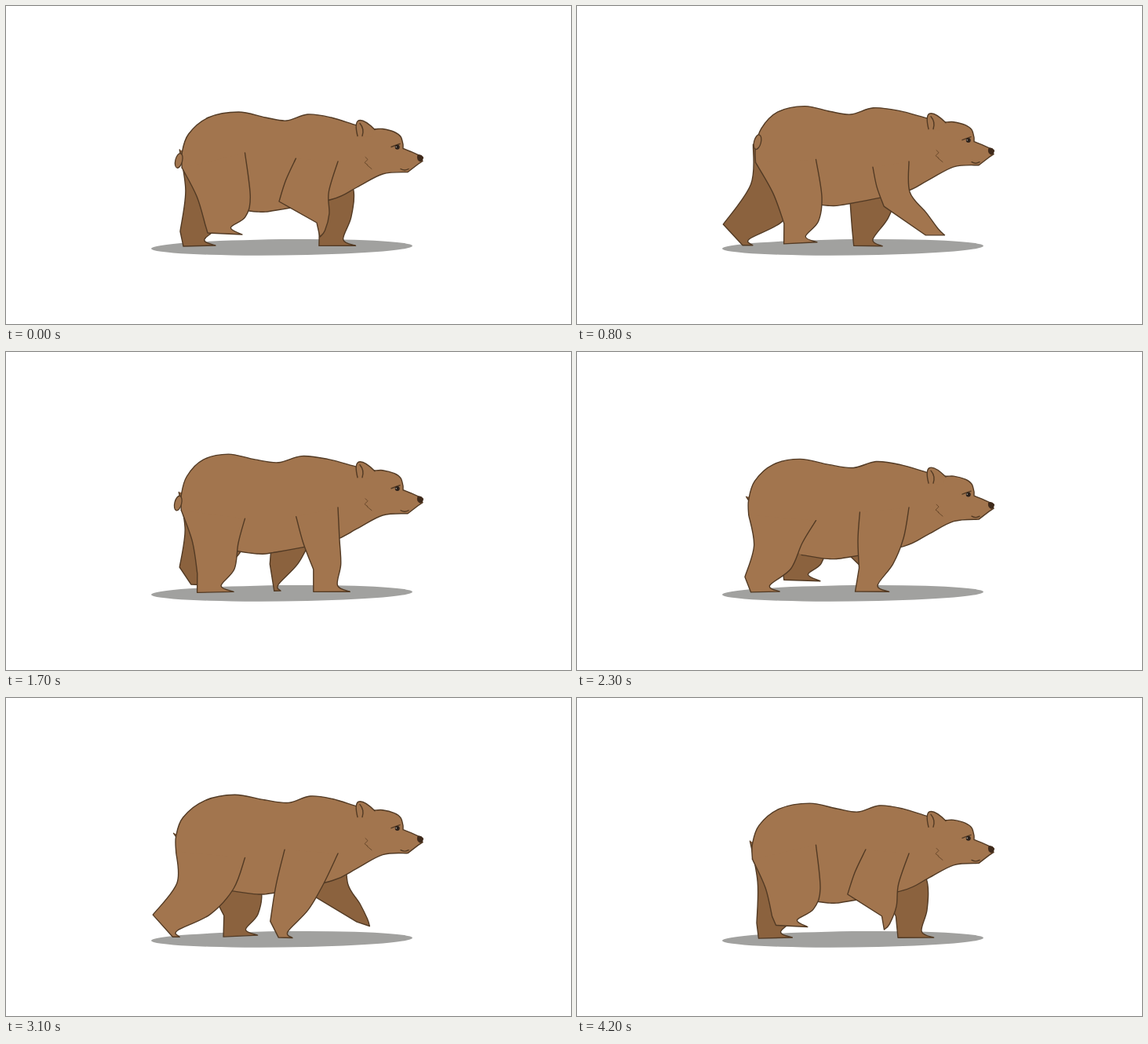
Write an HTML page that moves like this. It is 720 by 405 pixels and loops after 4300 ms.

```html
<!DOCTYPE html>
<html lang="en">
<head>
<meta charset="utf-8">
<title>Walking bear</title>
<style>
  html, body { margin: 0; width: 100%; height: 100%; overflow: hidden; background: #fff; }
  svg { display: block; width: 100%; height: 100%; }
  path, ellipse { stroke-linecap: round; stroke-linejoin: round; }
  .fur { fill: #a2754e; }
  .shade { fill: #8b623e; stroke: #523a24; stroke-width: 1.4; }
  .line { fill: none; stroke: #523a24; stroke-width: 1.4; }
  .thin { fill: none; stroke: #6b4a2c; stroke-width: 1; }
</style>
</head>
<body>
<svg viewBox="0 0 720 405">
  <ellipse cx="351.5" cy="307.3" rx="166.5" ry="10.2" fill="#a1a19f" transform="rotate(-.6 351.5 307.3)"/>
  <path id="farHind" class="shade"/>
  <path id="farFore" class="shade"/>
  <path id="body" class="fur"/>
  <path id="outline" class="line"/>
  <path id="hindFur" class="fur"/>
  <path id="hind" class="line"/>
  <path id="foreFur" class="fur"/>
  <path id="fore" class="line"/>
  <ellipse id="tail" class="fur" rx="4.4" ry="9.5" stroke="#523a24" stroke-width="1.3"/>
  <g id="head">
    <path class="fur" d="M449 168C446 160 445 149 449 146.500C455 144 464 152 470 158L466 167Z"/>
    <path class="line" d="M448 166C446 158 445 149 449 146.500C455 144 464 152 470 158"/>
    <path class="line" d="M451 150Q457 157 454 166"/>
    <path class="line" d="M491 180Q496 178 502 176M503 208Q508 211 513 208"/>
    <path class="thin" d="M458 193L461 196L457 200L461 203M460 203L466 208"/>
    <circle cx="498.700" cy="180.300" r="3" fill="#2b211b"/>
    <circle cx="497.300" cy="180" r=".8" fill="#b9b3a8"/>
    <path d="M524 191Q528 188 532 193Q532 197 528 199Q523 197 524 191Z" fill="#3f2a1b"/>
  </g>
</svg>
<script>
const LOOP = 4300;

const spine = [[222, 206], [222, 187], [230, 163], [254, 142], [290, 135],
               [325, 142], [354, 146], [382, 138], [413, 142], [447, 152]];
const brow = [[467, 157], [480, 157], [495, 161], [503, 167], [506, 177]];
const snout = [[506, 182], [516, 186], [527, 191], [531, 198], [525, 202], [512, 212]];
const belly = [[480, 214], [447, 231], [416, 246], [345, 260], [320, 262], [286, 257]];

// Hock (or wrist), heel and toe at six even steps of a stride
const hindStride = [
  [[254, 279], [257, 289], [301, 291]],
  [[264, 277], [264, 302], [306, 300]],
  [[254, 279], [253, 306], [300, 305]],
  [[222, 287], [226, 306], [267, 305]],
  [[187, 279], [211, 305], [226, 305]],
  [[203, 272], [224, 301], [229, 301]]
];
const foreStride = [
  [[348, 249], [396, 276], [400, 294]],
  [[388, 253], [444, 290], [466, 291]],
  [[402, 278], [412, 304], [455, 304]],
  [[366, 272], [359, 305], [405, 305]],
  [[340, 290], [352, 305], [377, 306]],
  [[337, 264], [344, 302], [349, 303]]
];

const $ = id => document.getElementById(id);
const draw = (id, d) => $(id).setAttribute('d', d);
const wave = (p, peak) => Math.cos(2 * Math.PI * (p - peak));
const mix = (a, b, k) => a.map((v, i) => v + (b[i] - v) * k);
const move = ([x, y], dx, dy) => [x + dx, y + dy];

// Cubic through b and c, with neighbours a and d
const cubic = (a, b, c, d, k) =>
  b + k / 2 * (c - a + k * (2 * a - 5 * b + 4 * c - d + k * (3 * (b - c) + d - a)));

function strideAt(stride, phase) {
  const n = stride.length, s = (phase % 1 + 1) % 1 * n, i = Math.floor(s);
  const near = [-1, 0, 1, 2].map(d => stride[(i + d + n) % n]);
  return stride[0].map((_, joint) => [0, 1].map(axis =>
    cubic(...near.map(row => row[joint][axis]), s - i)));
}

// Smooth curve through points, without the opening move
function curve(pts) {
  let d = '';
  for (let i = 0; i < pts.length - 1; i++) {
    const p = pts[i - 1] || pts[i], a = pts[i], b = pts[i + 1], n = pts[i + 2] || b;
    const c = [0, 1].map(j => a[j] + (b[j] - p[j]) / 6);
    const e = [0, 1].map(j => b[j] - (n[j] - a[j]) / 6);
    d += `C${[...c, ...e, ...b].map(v => v.toFixed(1))}`;
  }
  return d;
}

// Outline of a limb: down the rear, around the foot, up the front
function limb(rear, crease, front, [hock, heel, toe], bulge, bend) {
  const dx = toe[0] - heel[0], dy = toe[1] - heel[1], len = Math.hypot(dx, dy) || 1;
  const mid = move(mix(rear, hock, .5), bulge, 0);
  const instep = move(mix(heel, toe, .66), 8 * dy / len, -8 * dx / len);
  const shin = move(mix(instep, front, .5), bend, bend);
  return `M${rear}${curve([rear, mid, hock])}L${heel}L${toe}${curve([toe, instep, shin, front, crease])}`;
}

// The far legs reach further forward than the near ones
const reach = (p, far) => far ? 15 * Math.max(0, wave(p, .25)) : 0;

function hindLeg(p, rump, far) {
  const ahead = reach(p, far);
  const joints = strideAt(hindStride, p).map(j => move(j, ahead, 0));
  const bulge = 4 + .25 * Math.max(0, 235 - joints[0][0]);
  return limb(rump, [304.5, 201 - 14 * wave(p, 0)], [300 + 14 * wave(p, .1) + ahead, 243], joints, bulge, 6);
}

function foreLeg(p, far) {
  const ahead = reach(p, far), spread = far ? 2 : 1;
  const joints = strideAt(foreStride, p).map(j => move(j, ahead, 0));
  const rear = [366 + 11 * spread * wave(p, .2), 200 + 10 * wave(p, .35)];
  return limb(rear, [423 + ahead, 198], [415 + 12 * spread * wave(p, .3) + ahead, 237], joints, -2, 3);
}

function stepTime(t) {
  if (t >= 4200) return 4200;
  const base = t < 1100 ? 0 : 1100;
  return base + Math.floor((t - base) / 200) * 200;
}

function render(t) {
  const p = t / LOOP;
  const bob = 7.5 * wave(2 * p, .07) - 1.8 * wave(4 * p, 0) - 5;
  const lift = ([x, y]) => [x, y + bob * (.65 + x / 800)];

  // A wave runs along the back while the rump follows the near leg
  const sway = ([x, y]) => {
    const lag = Math.min(.19, .06 + (x - 290) * .0018);
    const back = 8 * Math.sin(Math.PI * Math.max(0, x - 215) / 234) * wave(p, -lag);
    const rump = 5 * Math.max(0, (255 - x) / 33) * wave(p, .2);
    return lift([x, y]).map((v, i) => i ? v : v + back + rump);
  };

  const headY = 1.2 * bob - .5;
  const nod = point => move(point, 0, headY);
  const back = spine.map(sway), face = snout.map(nod);
  const top = [...back, ...brow.map(nod)];
  const body = `M${top[0]}${curve(top)}L${face.join('L')}${curve([face[5], ...belly.map(lift)])}`;
  draw('body', body + 'Z');
  draw('outline', body);

  const hind = hindLeg(p, back[0], false), fore = foreLeg(p, false);
  draw('hindFur', hind + 'Z');
  draw('hind', hind);
  draw('foreFur', fore + 'Z');
  draw('fore', fore);
  draw('farHind', hindLeg(p + .5, move(back[1], -3, -4), true));
  draw('farFore', foreLeg(p + .4, true));

  const wag = Math.sin(Math.PI * t / 1700);
  const [tailX, tailY] = move(back[0], -4 + 6.5 * wag, -9 - 17 * wag);
  $('tail').style.display = t < 2000 ? '' : 'none';
  $('tail').setAttribute('transform', `translate(${tailX} ${tailY}) rotate(14)`);
  $('head').setAttribute('transform', `translate(0 ${headY})`);
}

const start = performance.now();
function tick() {
  render(stepTime((performance.now() - start) % LOOP));
  requestAnimationFrame(tick);
}
tick();
</script>
</body>
</html>
```
